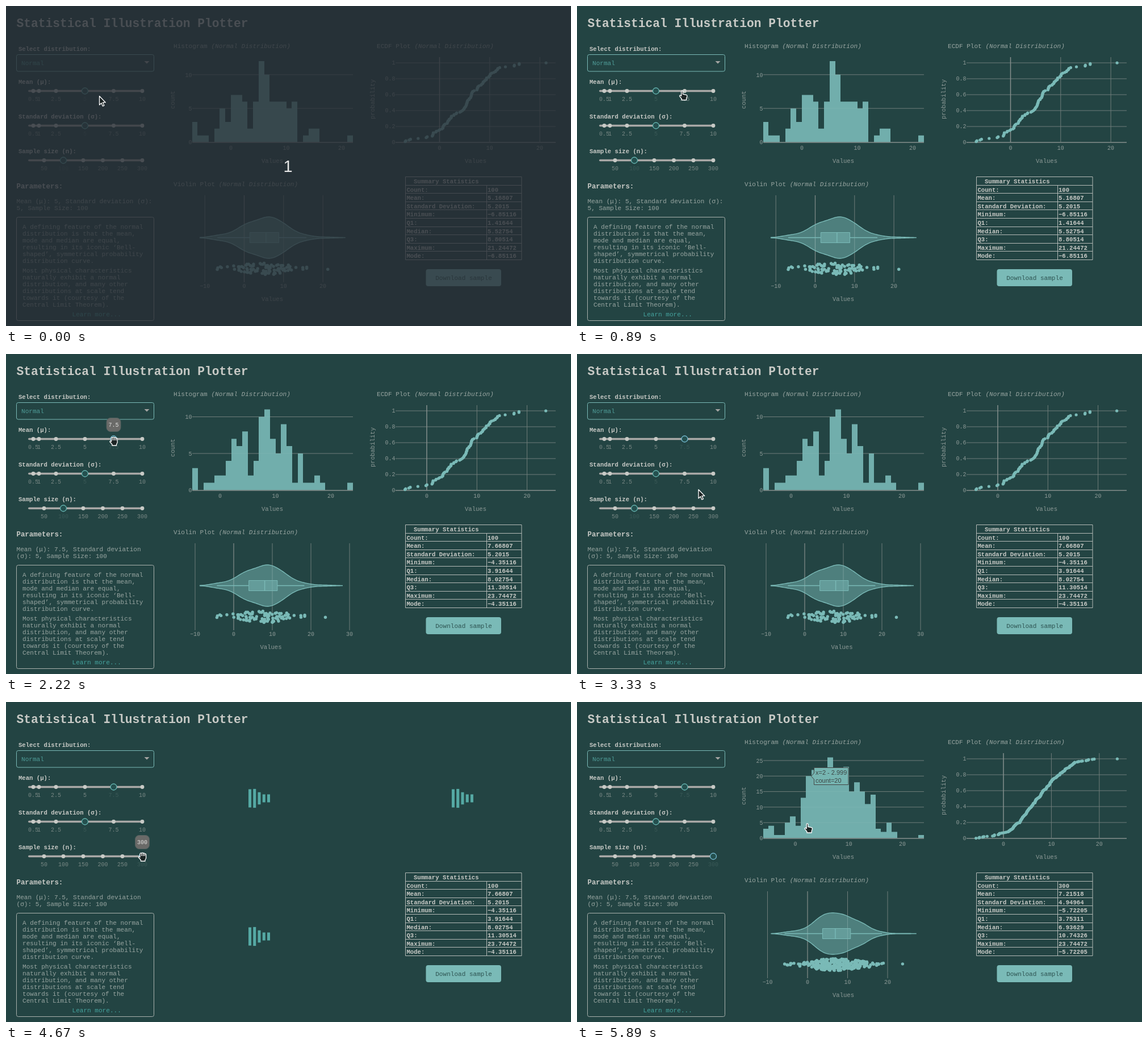
An HTML page with a canvas for the animation above (8 s loop, 995 by 563 pixels).

```html
<!DOCTYPE html>
<html lang="en">
<head>
<meta charset="utf-8">
<title>Statistical Illustration Plotter</title>
<style>
html, body { margin: 0; width: 995px; height: 563px; overflow: hidden; background: #234443; }
canvas { display: block; }
</style>
</head>
<body>
<canvas id="stage" width="995" height="563"></canvas>
<script>
const c = document.getElementById('stage').getContext('2d');
const MONO = '"Liberation Mono", "Courier New", monospace';
const BG = '#234443', TEAL = '#7abab7', LIGHT = '#c8cac6', BODY = '#99a6a2', GRID = '#6f7d7a', AXIS = '#8d9a97';

let seed = 7;
const rand = () => (seed = (seed * 16807) % 2147483647) / 2147483647;

// Each state: histogram, ECDF and violin axes as [x of zero, pixels per unit].
const states = [
  { mean: 5, start: -7, hist: [396, 9.755], ecdf: [763.5, 8.83], violin: [419.5, 6.93],
    bins: [3,1,1,0,2,5,3,7,7,6,2,6,12,10,6,6,6,5,6,0,1,2,2,0,0,0,0,0,1],
    unitY: 11.87, ticksY: [0, 5, 10], ticksV: [-10, 0, 10, 20], whisker: 15.8, valuesX: 469,
    stats: [100, 5.16807, 5.2015, -6.85116, 1.41644, 5.52754, 8.80514, 21.24472, -6.85116] },
  { mean: 7.5, start: -5, hist: [377, 9.755], ecdf: [741, 8.83], violin: [401, 6.8],
    bins: [3,0,1,1,2,2,4,7,6,8,2,4,10,11,7,5,9,6,1,5,1,1,2,1,0,0,0,0,1],
    unitY: 12.9, ticksY: [0, 5, 10], ticksV: [-10, 0, 10, 20, 30], whisker: 18.3, valuesX: 466.5,
    stats: [100, 7.66807, 5.2015, -4.35116, 3.91644, 8.02754, 11.30514, 23.74472, -4.35116] },
  { mean: 7.5, start: -6, hist: [384.5, 9.43], ecdf: [751, 8.44], violin: [406, 7.05],
    bins: [3,4,1,1,5,7,4,13,20,22,22,21,26,21,21,23,15,18,15,11,14,3,2,5,2,0,0,0,0,1],
    unitY: 5.46, ticksY: [0, 5, 10, 15, 20, 25], ticksV: [-10, 0, 10, 20], whisker: 18.6, valuesX: 469,
    stats: [300, 7.21518, 4.94964, -5.72205, 3.75311, 6.93629, 10.74326, 23.74472, -5.72205] }
];

const sample = s => s.bins.flatMap((n, i) => Array.from({ length: n }, () => s.start + i + rand()))
  .map(v => Math.max(v, s.stats[3])).sort((a, b) => a - b);

for (const s of states) {
  const [n, , sd, min, q1, , q3, max] = s.stats;
  s.data = s === states[1] ? states[0].data.map(v => v + 2.5) : sample(s);
  s.data[0] = min;
  s.data[n - 1] = max;
  const bw = 1.059 * Math.min(sd, (q3 - q1) / 1.349) * n ** -.2;
  const density = x => s.data.reduce((a, v) => a + Math.exp(-(((x - v) / bw) ** 2) / 2), 0);
  const lo = min - 2 * bw, hi = max + 2 * bw;
  s.curve = Array.from({ length: 101 }, (_, i) => {
    const x = lo + (hi - lo) * i / 100;
    return [x, density(x)];
  });
  const peak = Math.max(...s.curve.map(p => p[1]));
  s.curve.forEach(p => p[1] *= 36.5 / peak);
  s.jitter = s === states[1] ? states[0].jitter
    : s.data.map(v => (rand() - .5) * (4 + 17 * density(v) / peak));
}

// y is the middle of the capitals.
function text(str, x, y, { size = 11.07, color = BODY, style = '', align = 'left', font = MONO } = {}) {
  c.font = `${style} ${size}px ${font}`;
  c.fillStyle = color;
  c.textAlign = align;
  c.fillText(str, x, y + size * .33);
}

function line(x1, y1, x2, y2, color = GRID, width = 1) {
  c.beginPath();
  c.moveTo(x1, y1);
  c.lineTo(x2, y2);
  c.strokeStyle = color;
  c.lineWidth = width;
  c.stroke();
}

function box(x, y, w, h, r, fill, stroke) {
  c.beginPath();
  c.roundRect(x, y, w, h, r);
  if (fill) { c.fillStyle = fill; c.fill(); }
  if (stroke) { c.strokeStyle = stroke; c.lineWidth = 1; c.stroke(); }
}

function dot(x, y, r, color) {
  c.beginPath();
  c.arc(x, y, r, 0, 7);
  c.fillStyle = color;
  c.fill();
}

function vertical(str, x, y) {
  c.save();
  c.translate(x, y);
  c.rotate(-Math.PI / 2);
  text(str, 0, 0, { size: 10.62, color: AXIS, align: 'center' });
  c.restore();
}

const tick = (v, x, y, align = 'center') =>
  text(String(v).replace('-', '\u2212'), x, y, { size: 10, color: AXIS, align });
const axisTitle = (x, y) => text('Values', x, y, { size: 10.62, color: AXIS, align: 'center' });

function chartTitle(name, x, y) {
  text(name, x, y);
  text('(Normal Distribution)', x + (name.length + 1) * 6.643, y, { style: 'italic' });
}

function slider(label, y, xs, marks, active, focused) {
  text(label, 22, y - 16, { size: 10.62, color: LIGHT, style: 'bold' });
  box(39, y - 1.8, 202, 3.6, 1.8, '#aaa9a7');
  xs.forEach((x, i) => {
    dot(x, y, 3.4, LIGHT);
    text(marks[i], x, y + 14.3, { size: 10, color: i === active ? '#3a5957' : '#788784', align: 'center' });
  });
  dot(xs[active], y, 5.5, '#24504f');
  c.strokeStyle = focused ? '#74b9cf' : '#66b5b1';
  c.lineWidth = 1.3;
  c.stroke();
}

function tooltip(str, x, y, alpha) {
  c.globalAlpha = Math.min(1, alpha);
  box(x - 12.5, y - 12, 25, 24, 7, '#6a6a68', '#50605e');
  text(str, x, y, { size: 10, color: '#e2e2e0', align: 'center' });
  c.globalAlpha = 1;
}

function sidebar(s, k) {
  text('Statistical Illustration Plotter', 18.5, 30, { size: 21.25, color: LIGHT, style: 'bold' });
  text('Select distribution:', 22, 75.5, { size: 10.62, color: LIGHT, style: 'bold' });
  box(18.5, 85.5, 242, 29.5, 3, null, TEAL);
  text('Normal', 27, 100, { color: '#4f9c98' });
  c.beginPath();
  c.moveTo(243.5, 97);
  c.lineTo(252.5, 97);
  c.lineTo(248, 101.5);
  c.fillStyle = '#a5a5a3';
  c.fill();

  const xs = [48, 58, 88, 139, 189.5, 240], marks = ['0.5', '1', '2.5', '5', '7.5', '10'];
  slider('Mean (μ):', 149.5, xs, marks, k < 13 ? 3 : 4, k >= 13 && k < 38);
  slider('Standard deviation (σ):', 210.5, xs, marks, 3);
  slider('Sample size (n):', 271.5, [67, 101, 136, 170.5, 205, 240],
    ['50', '100', '150', '200', '250', '300'], k < 38 ? 1 : 5, k >= 38);

  text('Parameters:', 18.5, 317, { size: 12.4, color: LIGHT, style: 'bold' });
  const params = s.mean === 5
    ? ['Mean (μ): 5, Standard deviation (σ):', '5, Sample Size: ']
    : ['Mean (μ): 7.5, Standard deviation', '(σ): 5, Sample Size: '];
  text(params[0], 18.5, 343.5);
  text(params[1] + s.stats[0], 18.5, 355.5);

  box(18.5, 371.5, 242, 182, 3, null, '#a9b1ad');
  ['A defining feature of the normal', 'distribution is that the mean,', 'mode and median are equal,',
    'resulting in its iconic ‘Bell-', 'shaped’, symmetrical probability', 'distribution curve.']
    .forEach((l, i) => text(l, 29, 388.5 + 12 * i));
  ['Most physical characteristics', 'naturally exhibit a normal', 'distribution, and many other',
    'distributions at scale tend', 'towards it (courtesy of the', 'Central Limit Theorem).']
    .forEach((l, i) => text(l, 29, 465 + 12 * i));
  text('Learn more...', 116.5, 542, { color: '#45a39e' });
}

function table(s) {
  const border = '#b4bab7', row = 14.6, bold = { size: 10.62, color: LIGHT, style: 'bold' };
  box(703.5, 300.5, 204.5, 146, 0, null, border);
  line(846.5, 315, 846.5, 446.5, border);
  text('Summary Statistics', 718, 308, bold);
  ['Count', 'Mean', 'Standard Deviation', 'Minimum', 'Q1', 'Median', 'Q3', 'Maximum', 'Mode'].forEach((name, i) => {
    const y = Math.round(300 + row * (i + 1)) + .5;
    line(703.5, y, 908, y, border);
    text(name + ':', 705.5, y + 7.5, bold);
    text(String(s.stats[i]).replace('-', '\u2212'), 848, y + 7.5, bold);
  });
  box(739.5, 463, 132.5, 30, 4, TEAL);
  text('Download sample', 806, 478, { color: '#2d5351', align: 'center' });
}

function histogram(s) {
  const [zero, unit] = s.hist, base = 239.5;
  chartTitle('Histogram', 295, 70);
  for (const v of s.ticksY) {
    const y = base - v * s.unitY;
    if (v) line(328, y, 611, y);
    tick(v, 327.5, y + .5, 'right');
  }
  c.beginPath();
  s.bins.forEach((n, i) => {
    const x = Math.round(zero + (s.start + i) * unit), end = Math.round(zero + (s.start + i + 1) * unit);
    c.rect(x, base - n * s.unitY, end - x, n * s.unitY);
  });
  c.globalAlpha = .9;
  c.fillStyle = TEAL;
  c.fill();
  c.globalAlpha = 1;
  line(328, 240, 611, 240, '#858f8c', 1.4);
  for (const v of [0, 10, 20]) tick(v, zero + v * unit, 250);
  axisTitle(469, 272);
  vertical('count', 293, 165);
}

function ecdf(s) {
  const [zero, unit] = s.ecdf, n = s.data.length;
  chartTitle('ECDF Plot', 653, 70);
  for (let i = 0; i < 6; i++) {
    const y = 240 - 28 * i;
    line(686, y, 968, y, i ? GRID : '#858f8c', i ? 1 : 1.4);
    tick(i / 5, 685.5, y, 'right');
  }
  for (const v of [0, 10, 20]) {
    const x = zero + v * unit;
    line(x, 90, x, 240, v ? GRID : '#858f8c', v ? 1 : 1.5);
    tick(v, x, 250);
  }
  s.data.forEach((v, i) => dot(zero + v * unit, 240 - 140 * (i + 1) / n, 2.6, TEAL));
  axisTitle(827, 272);
  vertical('probability', 645, 164);
}

function violin(s) {
  const [zero, unit] = s.violin, X = v => zero + v * unit, mid = 407.5;
  const [, , , min, q1, median, q3] = s.stats;
  chartTitle('Violin Plot', 295, 313.5);
  for (const v of s.ticksV) {
    line(X(v), 333, X(v), 486, v ? GRID : '#7d8986', v ? 1 : 1.3);
    tick(v, X(v), 492.5);
  }
  c.beginPath();
  s.curve.forEach(([x, h]) => c.lineTo(X(x), mid - h));
  [...s.curve].reverse().forEach(([x, h]) => c.lineTo(X(x), mid + h));
  c.closePath();
  c.fillStyle = 'rgba(122,186,183,.5)';
  c.fill();
  c.strokeStyle = TEAL;
  c.lineWidth = 1.4;
  c.stroke();
  line(X(min), mid, X(q1), mid, TEAL, 1.3);
  line(X(q3), mid, X(s.whisker), mid, TEAL, 1.3);
  box(X(q1), 398.5, X(q3) - X(q1), 18, 0, 'rgba(122,186,183,.5)', TEAL);
  line(X(median), 398.5, X(median), 416.5, TEAL, 1.4);
  s.data.forEach((v, i) => dot(X(v), 462 + s.jitter[i], 2.7, TEAL));
  axisTitle(s.valuesX, 515);
}

// Five bars stretching one after another, 0.1 s apart.
function loader(cx, cy, sec) {
  c.fillStyle = '#55a9a4';
  for (let i = 0; i < 5; i++) {
    const u = Math.max(0, 1 - Math.abs((sec - .1 * i) / .24 - 1));
    const h = 14 + 21 * u * u * (3 - 2 * u);
    c.fillRect(cx - 19 + 8.25 * i, cy - h / 2, 5, h);
  }
}

function hoverLabel() {
  c.beginPath();
  [[417.5, 115.5], [478, 115.5], [478, 145.5], [417.5, 145.5], [417.5, 136], [412.5, 130.5], [417.5, 125]]
    .forEach(p => c.lineTo(...p));
  c.closePath();
  c.fillStyle = '#76b5b1';
  c.fill();
  c.strokeStyle = '#444';
  c.lineWidth = 1;
  c.stroke();
  const opts = { size: 11, color: '#3c4645', font: '"Liberation Sans", Arial, sans-serif' };
  text('x=2 - 2.999', 420, 124.5, opts);
  text('count=20', 420, 138, opts);
}

const shapes = {
  arrow: new Path2D('M.5 .5V16L4 12.8 6.4 18.2 8.9 17.1 6.5 11.7H11.3Z'),
  point: new Path2D('M-1.3 1.2Q0 -.6 1.4 1.2V6L7.5 7.4Q9.2 8 9 9.6L7.6 14V16.5H-.6V14.5L-4.3 9.8Q-4.6 8 -3 8L-1.3 9.4Z'),
  grab: new Path2D('M-4 1V-5Q-2.6 -7.5 -1.2 -5.6 .2 -8 1.6 -5.6 3 -7.2 4.3 -4.8 6 -5.6 6.6 -3.8V3L5 6V8H-2.6V6L-6.6 1.5Q-6.8 -1 -4 1Z' +
    'M-1.2 -5.6V-1M1.6 -5.6V-1M4.3 -4.8V-1')
};
// [tick, x, y] along the pointer's way
const way = [[2, 164, 158], [8, 185, 149], [12, 185, 149], [13, 189.5, 153], [25, 189.5, 153], [30, 213.5, 238],
  [33, 238, 265], [34, 240, 268], [37, 240, 268], [38, 240, 272], [47, 240, 272], [53, 405.5, 213.5]];
// [first tick, shape]
const looks = [[0, 'arrow'], [7, 'point'], [13, 'grab'], [26, 'arrow'], [33, 'point'], [38, 'grab'], [48, 'arrow'], [50, 'point']];

function pointer(k) {
  const j = way.findIndex(p => p[0] >= k);
  const b = way[j < 0 ? way.length - 1 : j], a = way[j - 1] || b;
  const f = a === b || j < 0 ? 1 : (k - a[0]) / (b[0] - a[0]);
  const shape = shapes[looks.filter(l => l[0] <= k).pop()[1]];
  c.save();
  c.translate(a[1] + (b[1] - a[1]) * f, a[2] + (b[2] - a[2]) * f);
  c.lineJoin = 'round';
  c.lineWidth = 1.3;
  c.fillStyle = '#1c2424';
  c.strokeStyle = '#fff';
  c.fill(shape);
  c.stroke(shape);
  c.restore();
}

function draw(ms) {
  const k = Math.floor((ms + 4) * .009); // nine ticks a second
  const s = states[k < 20 ? 0 : k < 43 ? 1 : 2];
  c.fillStyle = BG;
  c.fillRect(0, 0, 995, 563);
  sidebar(s, k);
  table(s);
  if ((k >= 18 && k < 20) || (k >= 40 && k < 43)) {
    const sec = k / 9 - (k < 20 ? 1.95 : 4.37);
    for (const [x, y] of [[446, 169.5], [804, 169.5], [446, 412.5]]) loader(x, y, sec);
  } else {
    histogram(s);
    ecdf(s);
    violin(s);
  }
  if (k >= 13 && k < 26) tooltip('7.5', 189.5, 124.5, (k - 12) * .35);
  if (k >= 38 && k < 48) tooltip('300', 240, 246.5, (k - 37) * .35);
  if (k >= 53) hoverLabel();
  if (k < 1) {
    c.fillStyle = 'rgba(40,45,52,.79)';
    c.fillRect(0, 0, 995, 563);
    text('1', 496.5, 282, { size: 29, color: '#e6e6e6', align: 'center', font: '"Liberation Sans", Arial, sans-serif' });
  }
  pointer(k);
}

const begin = performance.now();
function loop() {
  draw((performance.now() - begin) % 8000);
  requestAnimationFrame(loop);
}
loop();
</script>
</body>
</html>
```
